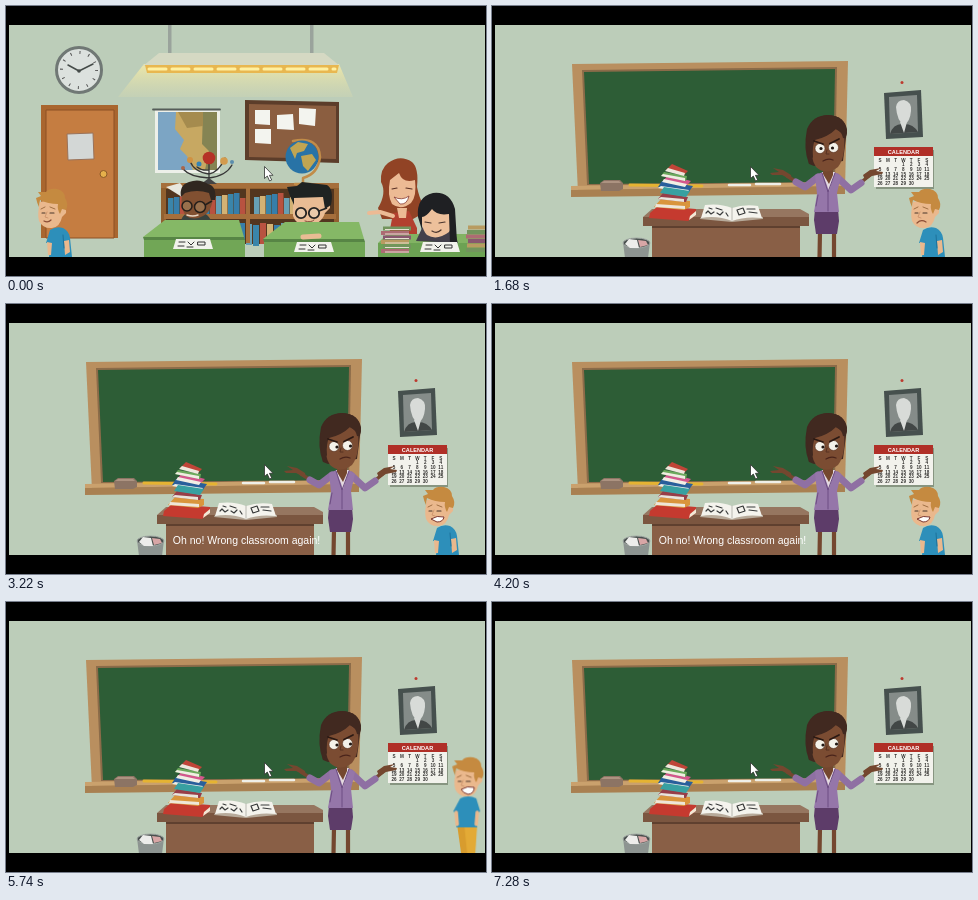
Animation, 480 px wide and 270 px high, one loop 7.42 s. Source, as an HTML page:

```html
<!DOCTYPE html>
<html lang="en">
<head>
<meta charset="utf-8">
<title>Wrong classroom</title>
<style>
html, body { margin: 0; width: 100%; height: 100%; overflow: hidden; background: #000; }
svg { display: block; width: 100vw; height: 100vh; }
text { font-family: "Liberation Sans", Arial, sans-serif; }
.sub { font-size: 10.5px; fill: #fff; }
.line { fill: none; stroke-linecap: round; stroke-linejoin: round; }

/* One step is 140 ms, or 1.8868 % of the loop */
.room, .lesson, .asking, .calm, .aside, .answer, .low, .low-talk, .low-sad, .tall, .walk, .jaw, .leg {
  animation: 7420ms step-end infinite;
}
.room { animation-name: room; }
.lesson { animation-name: lesson; }
.asking { animation-name: asking; }
.calm { animation-name: calm; }
.aside { animation-name: aside; }
.answer { animation-name: answer; }
.low { animation-name: low; }
.low-sad { animation-name: low-sad; }
.low-talk { animation-name: aside; }
.tall { animation-name: tall; }
.walk { animation-name: walk; }
.jaw { animation-name: jaw; transform-origin: 336px 151px; }
.leg { animation-name: leg; transform-origin: 437px 220px; }
@keyframes room { 0% { visibility: visible } 3.77%, 100% { visibility: hidden } }
@keyframes lesson { 0% { visibility: hidden } 3.77%, 100% { visibility: visible } }
@keyframes asking { 0% { opacity: 0 } 3.77% { opacity: 1 } 20.75%, 100% { opacity: 0 } }
@keyframes calm { 0% { opacity: 0 } 20.75% { opacity: 1 } 35.84%, 100% { opacity: 0 } }
@keyframes aside { 0% { opacity: 0 } 35.84%, 100% { opacity: 1 } }
@keyframes answer { 0% { opacity: 0 } 35.84% { opacity: 1 } 75.47%, 100% { opacity: 0 } }
@keyframes low { 0% { opacity: 1 } 60.37%, 100% { opacity: 0 } }
@keyframes low-sad { 0% { opacity: 1 } 35.84%, 100% { opacity: 0 } }
@keyframes tall { 0% { opacity: 0 } 60.37%, 100% { opacity: 1 } }
@keyframes walk {
  0% { transform: none }
  71.69% { transform: none; animation-timing-function: steps(8) }
  86.79%, 100% { transform: translate(54px, 9px) }
}
@keyframes jaw {
  0% { transform: scaleY(.5) } 5.66% { transform: none } 7.54% { transform: scaleY(.5) }
  9.43% { transform: none } 11.32% { transform: scaleY(.6) } 13.2% { transform: none }
  15.09% { transform: scaleY(.5) } 16.98%, 100% { transform: none }
}
@keyframes leg {
  0% { transform: none } 73.58% { transform: rotate(15deg) } 77.35% { transform: rotate(-8deg) }
  81.13%, 100% { transform: rotate(15deg) }
}
</style>
</head>
<body>
<svg viewBox="0 0 480 270" preserveAspectRatio="none">
<defs>
  <linearGradient id="glow" x2="0" y2="1">
    <stop stop-color="#eee7a8"/><stop offset="1" stop-color="#d3d8b0" stop-opacity=".35"/>
  </linearGradient>
  <g id="head">
    <path fill="#eab88d" d="M421 196Q418 208 420 215Q424 223 433 222Q441 221 443 211L447 207Q448 202 443 202L440 192Z"/>
    <path fill="#c58a40" d="M417 192L422 190L419 186L427 186Q430 182 438 183Q446 185 446 192Q450 198 447 204L443 203L441 208Q438 203 439 198Q429 198 421 194Q420 198 420 201Q418 197 417 192Z"/>
    <path class="line" stroke="#8d5e32" stroke-width=".8" d="M422 203L426 201M431 201L436 203"/>
    <path class="line" stroke="#49362c" stroke-width="1.1" d="M423 207H426M431 207H435"/>
    <path class="line" stroke="#c88e67" stroke-width=".8" d="M428 206L426 211L429 212"/>
  </g>
  <g id="slouch">
    <path fill="#2d8fba" d="M431 224Q437 220 444 222Q450 225 451 232L453 251H430L432 237L427 237Z"/>
    <path fill="#eab88d" d="M445 235L450 234L451 246L446 249ZM428 236L433 237L432 249L429 249Z"/>
    <path class="line" stroke="#1d719a" stroke-width="1" d="M444 229L445 242"/>
    <use href="#head"/>
  </g>
  <g id="sheet">
    <path fill="#f2f2ec" d="M-17 -5H17L20 5H-20Z"/>
    <path class="line" stroke="#333" stroke-width="1" d="M-14 -2H-8M-5 -2L-2 1L1 -2M5 -2H12V1H5ZM-15 2H-9M-6 3H0"/>
  </g>
  <g id="desk">
    <path fill="#85b866" d="M22 0H96L101 17H0Z"/>
    <path fill="#578545" d="M0 17H101L102 20H1Z"/>
    <path fill="#71a656" d="M1 20H102V40H1Z"/>
  </g>
</defs>
<rect width="480" height="270" fill="#bccdb9"/>

<g class="room">
  <g id="lamp">
    <path fill="url(#glow)" d="M138 58H333L347 91H112Z"/>
    <path fill="#9aa39c" d="M162 19h3.5v29h-3.5zM304 19h3.5v29h-3.5z"/>
    <path fill="#d5d9c3" d="M153 47H318L334 60H137Z"/>
    <path fill="#e8b750" d="M139 59H333L331 67H141Z"/>
    <path class="line" stroke="#fff0a0" stroke-width="3" stroke-dasharray="17 6" d="M143 63H329"/>
  </g>
  <g id="clock">
    <circle cx="73" cy="64" r="22.5" fill="#dce1de" stroke="#707875" stroke-width="3"/>
    <circle cx="73" cy="64" r="17.5" fill="none" stroke="#555" stroke-width="3" stroke-dasharray="1 8.163"/>
    <path class="line" stroke="#454b49" stroke-width="1.5" d="M62 59L73 65L87 58"/>
    <circle cx="73" cy="65" r="1.8" fill="#454b49"/>
  </g>
  <path fill="#a9662f" d="M35 99H112V232H35Z"/>
  <path fill="#c57d41" stroke="#8c5024" d="M40 104H108V232H40Z"/>
  <path fill="#d3d7d6" stroke="#99725a" d="M61 128L87 127L88 153L62 154Z"/>
  <circle cx="97.500" cy="168" r="3.500" fill="#e5b04b" stroke="#8b5a28"/>

  <path fill="#edf0e9" d="M149 103H214V167H149Z"/>
  <path fill="#7ca5c4" d="M152 106H211V164H152Z"/>
  <path fill="#c7a862" d="M170 106H211V164H187L181 150L174 143L178 134L169 123Z"/>
  <path fill="#858453" d="M197 106H211V164H199L203 145L196 138Z"/>
  <path fill="#a58b4e" d="M172 106H197V120L181 122Z"/>
  <path class="line" stroke="#555c58" stroke-width="1.800" d="M147 103.500H214"/>

  <path fill="#5c3d2a" d="M239 94L333 96V157L239 154Z"/>
  <path fill="#8b5e40" d="M243 98L330 100V153L243 151Z"/>
  <path fill="#f3f4ef" d="M249 104L264 104L264 119L249 118ZM249 123L265 123L265 138L249 137ZM271 109L287 108L288 124L271 123ZM293 102L310 103L309 120L293 118Z"/>

  <g id="shelf">
    <path fill="#92602f" d="M155 178H333V238H155Z"/>
    <path fill="#53361f" d="M160 183H328V208H160ZM160 213H328V238H160Z"/>
    <g id="books"></g>
    <path fill="#a66f3c" d="M155 177H333V182H155ZM158 208H330V213H158ZM240 182h4v55h-4z"/>
  </g>
  <g id="orrery">
    <path class="line" stroke="#363637" stroke-width="1.300" d="M203 153V178M177 163Q184 171 203 172Q220 170 226 159M184 155Q188 166 203 168Q213 166 219 152M191 161Q196 165 203 164"/>
    <path fill="#444" d="M195 178L203 172L211 178Z"/>
    <circle cx="203" cy="152" r="6.300" fill="#b53227"/>
    <circle cx="184" cy="154" r="3" fill="#d09243"/>
    <circle cx="193" cy="158" r="2.500" fill="#3484b7"/>
    <circle cx="218" cy="155" r="3.800" fill="#d39b4d"/>
    <circle cx="226" cy="156" r="2" fill="#5b8dad"/>
    <circle cx="177" cy="162" r="2" fill="#a9664c"/>
  </g>
  <g id="globe">
    <path class="line" stroke="#c18c48" stroke-width="2.500" d="M287 135Q313 130 314 151Q312 168 297 172V178M289 178H305"/>
    <circle cx="296" cy="151" r="16.500" fill="#2873a6"/>
    <path fill="#c0a552" d="M284 142L292 136L302 138L298 145L291 147L289 153ZM295 150L306 148L310 154L302 165L297 160Z"/>
  </g>

  <g id="pupil">
    <path fill="#e8e8df" d="M160 181L174 177L181 186L176 191Z"/>
    <path fill="#39433e" d="M174 220Q175 205 190 205Q204 206 207 220Z"/>
    <path fill="#815031" d="M176 187Q174 202 180 210Q188 215 197 210Q206 206 207 190L204 182L179 181Z"/>
    <path fill="#302720" d="M175 191Q173 179 183 176Q193 172 202 178Q211 180 209 194L205 194L203 187Q191 183 179 187Z"/>
    <g fill="#98704c" stroke="#251f1b" stroke-width="1.500">
      <circle cx="181" cy="200" r="5"/><circle cx="194" cy="201" r="5.500"/><path d="M199 199L206 195"/>
    </g>
    <path class="line" stroke="#e8d6c4" stroke-width="1.500" d="M181 209Q187 211 192 209"/>
  </g>
  <g id="classmate">
    <path fill="#303935" d="M291 236L295 221L311 216L324 223L324 237Z"/>
    <path fill="#e9bc94" d="M287 190L287 210Q290 219 301 220Q315 219 319 207L324 202V193L315 187Z"/>
    <path fill="#1f2322" d="M284 190L281 181L291 180L296 176L321 179Q328 183 325 199L319 203L317 191L288 192V199Z"/>
    <g fill="#e9c9aa" stroke="#222" stroke-width="1.800">
      <circle cx="295" cy="207" r="5.200"/><circle cx="308" cy="207" r="5.200"/><path d="M313 205L321 202"/>
    </g>
    <path class="line" stroke="#884e3c" d="M299 215Q305 217 308 214"/>
  </g>
  <use href="#desk" x="137" y="214"/>
  <use href="#desk" x="257" y="216"/>
  <path class="line" stroke="#e9bc94" stroke-width="5" d="M297 231L313 230"/>
  <use href="#sheet" x="187" y="238"/>
  <use href="#sheet" x="308" y="241"/>

  <g id="redhead">
    <path fill="#914325" d="M382 157Q394 148 406 156Q413 162 411 181Q415 200 423 204L407 213H376L372 202Q381 187 375 176Q374 163 382 157Z"/>
    <path fill="#b2402f" d="M383 229L387 207L403 205L411 222V231Z"/>
    <path fill="#ecba94" d="M384 174Q381 189 386 198Q395 205 405 197Q411 190 409 174Q397 178 393 167ZM391 202H401L400 212H393Z"/>
    <path class="line" stroke="#593024" stroke-width="1.200" d="M386 183L391 182M400 182L406 183"/>
    <path fill="#fff" stroke="#883d34" stroke-width=".8" d="M388 191Q396 195 403 190Q401 199 394 198Z"/>
    <path class="line" stroke="#ecba94" stroke-width="4" d="M363 207L374 206L387 210"/>
  </g>
  <path fill="#82b363" d="M381 228H480V237H372Z"/>
  <path fill="#6ca253" d="M372 237H480V252H372Z"/>
  <g id="writer">
    <path fill="#44404b" d="M410 235L417 220H447L452 237Z"/>
    <path fill="#edc09b" d="M417 200Q413 221 421 229Q431 235 443 226Q449 217 443 199Z"/>
    <path fill="#1f2023" d="M412 211Q410 191 427 187Q444 185 449 203L451 236L444 238L443 208Q431 210 426 203Q420 211 416 211L416 224Z"/>
    <path class="line" stroke="#49342d" stroke-width="1.200" d="M419 216L425 217M433 217L439 216M426 225Q431 228 435 224"/>
  </g>
  <use href="#sheet" x="434" y="241"/>
  <g id="stacks"></g>
  <use href="#slouch" x="-387"/>
  <path class="line" stroke="#8b4c35" stroke-width="1.200" d="M38 215Q42 217 45 214"/>
</g>

<g class="lesson">
  <g id="board">
    <path fill="#b98f5f" d="M80 58L356 55L353 184L86 187Z"/>
    <path fill="#8b6b49" d="M90 64L345 61L343 177L95 179Z"/>
    <path fill="#2d5d36" d="M92 66L343 63L341 176L97 178Z"/>
    <path fill="#caa16d" d="M79 180L353 176V180L79 184Z"/>
    <path fill="#a98051" d="M79 184L353 180V188L79 191Z"/>
    <path fill="#8c7464" d="M108 177L112 174H128L131 177V183L127 185H109Z"/>
    <path fill="#ad9381" d="M109 177L112 175H127L129 177Z"/>
    <path class="line" stroke="#e5b332" stroke-width="3" d="M138 179L210 180"/>
    <path class="line" stroke="#efefe8" stroke-width="2.500" d="M237 179L258 179M264 178L288 178"/>
  </g>
  <g id="portrait">
    <circle cx="410" cy="76.500" r="1.500" fill="#bd3a2f"/>
    <path fill="#46504e" d="M392 87L429 84L431 131L394 133Z"/>
    <path fill="#858c89" d="M397 91L425 89L426 126L398 128Z"/>
    <path fill="#424746" d="M398 128Q401 118 410 118Q421 117 426 126Z"/>
    <path fill="#d8dbd8" d="M404 101Q405 94 412 94Q420 96 419 105Q418 116 412 119Q405 115 404 101ZM408 116H415L412 127Z"/>
  </g>
  <g id="calendar">
    <path fill="#879581" d="M384 144H442V183H384Z"/>
    <path fill="#f2f2ec" d="M382 142H441V181H382Z"/>
    <path fill="#b02f27" d="M382 141H441V150H382Z"/>
    <text x="411.500" y="147.800" font-size="5.600" font-weight="700" text-anchor="middle" fill="#fff">CALENDAR</text>
    <g id="days" font-size="4.600" font-weight="700" text-anchor="middle" fill="#343331"></g>
  </g>

  <g id="teacher">
    <path class="line" stroke="#74472f" stroke-width="4.200" d="M328 225L327.500 252M342 225L342 252"/>
    <path fill="#5d3c69" d="M323 203H346L347 215L345 228H324L322 214Z"/>
    <path class="line" stroke="#74472f" stroke-width="3.500" d="M306 177L295 170M367 178L377 170"/>
    <path fill="#74472f" d="M300 174L290 169L280 169L278 167L287 166L281 162L291 164L299 169ZM373 174L380 170L390 168L391 166L384 165L389 162L378 164L371 169Z"/>
    <path class="line" stroke="#8f70a3" stroke-width="7" d="M326 171L313 181L304 176M345 171L359 184L369 177"/>
    <path fill="#9576a9" d="M323 169L331 166H342L349 170L345 187L347 206H322L325 188Z"/>
    <path fill="#e4d9df" d="M330 166H343L337 185Z"/>
    <path fill="#74472f" d="M331 160H341V169L337 178L331 168Z"/>
    <path class="line" stroke="#6d4d83" stroke-width="1" d="M330 167L336 186L343 167M336 186V205M326 189L324 200"/>
    <path fill="#412920" d="M317 158Q311 143 315 123Q321 109 336 109Q353 110 355 124L351 155L322 160Z"/>
    <path fill="#7b4c32" d="M320 134Q318 153 324 161Q334 170 346 161Q354 151 352 128L342 122Z"/>
    <path fill="#412920" d="M315 140Q312 112 335 109Q354 109 355 127Q354 133 351 132Q350 126 344 123Q336 131 323 134Q320 140 321 151L317 158Z"/>
    <g fill="#f4f2ea" stroke="#54301f" stroke-width=".6">
      <circle cx="328" cy="142.500" r="5"/><circle cx="341.500" cy="141.500" r="5"/>
    </g>
    <path class="line" stroke="#2b1913" stroke-width="1.800" d="M322 135L331 138M338 137.500L347 133"/>
    <path class="line" stroke="#573020" stroke-width="1" d="M335 144L334 148L337 148"/>
    <g class="asking">
      <circle cx="329" cy="142.500" r="1.600" fill="#221814"/><circle cx="340.500" cy="142" r="1.600" fill="#221814"/>
      <g class="jaw">
        <path fill="#57201b" d="M329 151Q337 153 344 150Q344 160 336 161Q329 160 329 151Z"/>
        <path fill="#fff" d="M330 152Q337 154 343 151V154Q337 156 330 155Z"/>
      </g>
    </g>
    <g class="calm">
      <circle cx="329" cy="142.500" r="1.600" fill="#221814"/><circle cx="340.500" cy="142" r="1.600" fill="#221814"/>
      <path class="line" stroke="#4a241b" stroke-width="1.300" d="M331 155Q336 152 341 154"/>
    </g>
    <g class="aside">
      <circle cx="331" cy="143" r="1.600" fill="#221814"/><circle cx="344.500" cy="142" r="1.600" fill="#221814"/>
      <path class="line" stroke="#4a241b" stroke-width="1.300" d="M334 155Q339 152 344 154"/>
    </g>
  </g>

  <g id="bin">
    <path fill="#8d9491" d="M131 236L133 252H156L158 236Z"/>
    <ellipse cx="144.500" cy="237" rx="13.500" ry="5" fill="#49504e" stroke="#a2a9a5"/>
    <path fill="#ededeb" d="M133 238L137 233L145 234L147 242L138 242Z"/>
    <path fill="#d8a6a6" d="M146 234L154 235L156 239L148 241Z"/>
  </g>
  <g id="table">
    <path fill="#967660" d="M160 203H308L317 208V211H151Z"/>
    <path fill="#7b5640" d="M151 211H317V220H151Z"/>
    <path fill="#895f46" d="M160 220H308V252H160Z"/>
    <path fill="#5f402f" d="M160 220H308V222H160Z"/>
  </g>
  <g id="pile">
    <path fill="#c53a2f" d="M166 200L204 203V209L196 215L157 212L158 207Z"/>
    <path fill="#f1e8d5" d="M198 210L204 205V209L197 214Z"/>
    <path fill="#d9953c" d="M169 193L198 195L198 201L192 204L162 201Z"/>
    <path fill="#eee6d8" d="M164 198L193 200V203L163 201Z"/>
    <path fill="#973e48" d="M171 187L196 191L194 196L166 193Z"/>
    <path fill="#e9e5dc" d="M169 191L192 193V196L166 193Z"/>
    <path fill="#295f9b" d="M170 175L201 180L196 187L166 181Z"/>
    <path fill="#eceee8" d="M169 180L197 184L195 187L166 182Z"/>
    <path fill="#38a0a1" d="M172 181L198 185L194 191L168 187Z"/>
    <path fill="#d3578c" d="M176 169L199 175L195 179L171 175Z"/>
    <path fill="#f1eee4" d="M172 173L195 178L193 181L170 176Z"/>
    <path fill="#6ca95c" d="M172 166L195 170L194 175L169 170Z"/>
    <path fill="#f0eee2" d="M171 168L193 172L193 175L169 170Z"/>
    <path fill="#c04538" d="M180 158L196 165L192 169L174 164Z"/>
    <path fill="#eee8dd" d="M176 162L193 167L192 170L173 165Z"/>
  </g>
  <g id="open-book">
    <path fill="#b7aa9a" d="M208 213L240 216L271 213V211H209Z"/>
    <path fill="#f4f3ed" d="M213 199Q228 197 240 202Q252 198 266 200L270 212Q253 210 240 215Q225 209 209 212Z"/>
    <path class="line" stroke="#393b3b" stroke-width="1.200" d="M217 202L220 203M224 202L230 204M214 207L216 205L219 208L222 206M225 207L228 209L231 206M234 207L236 210M245 204L251 202L253 207L247 209ZM255 203H263M257 206L265 207"/>
    <path class="line" stroke="#a9a8a1" stroke-width=".8" d="M240 202V214"/>
  </g>

  <g class="low">
    <use href="#slouch"/>
    <path class="line low-sad" stroke="#8b4c35" stroke-width="1.200" d="M425 217Q429 213 434 216"/>
    <path class="low-talk" fill="#fff" stroke="#7a352c" stroke-width="1" d="M425 215Q431 211 438 213Q437 218 431 218Z"/>
  </g>
  <g class="tall">
    <g class="walk">
      <path class="leg" fill="#d89c2e" d="M431 219H442L440 246H443V249H431Z"/>
      <path fill="#e3aa36" d="M438 219H451L449 249H441Z"/>
      <path fill="#2d8fba" d="M434 193Q442 189 450 193L454 206L451 208V222H430V208L427 206Z"/>
      <path class="line" stroke="#eab88d" stroke-width="3.500" d="M430 207L431 219M451 207L450 219"/>
      <use href="#head" x="9" y="-31"/>
      <path fill="#fff" stroke="#7a352c" stroke-width="1" d="M435 184Q441 180 448 182Q448 188 442 189Q437 188 435 184Z"/>
    </g>
  </g>
  <text class="sub asking" x="183.500" y="240.500">Are you even in this class?</text>
  <text class="sub answer" x="166.800" y="240.200">Oh no! Wrong classroom again!</text>
</g>

<path fill="#fff" stroke="#303431" stroke-width=".8" d="M258.500 160.500V172.500L261.300 170L263.600 175L265.700 174L263.400 169.300H267Z"/>
<path fill-rule="evenodd" d="M0 0H480V270H0ZM3 19V251H479V19Z"/>
</svg>
<script>
const add = (id, tag, attrs, text = "") => {
  const node = document.createElementNS("http://www.w3.org/2000/svg", tag);
  for (const key in attrs) node.setAttribute(key, attrs[key]);
  node.textContent = text;
  document.getElementById(id).append(node);
};
const bar = (id, x, y, width, height, fill) => add(id, "rect", { x, y, width, height, fill });
const covers = ["#3a85aa", "#b85240", "#d3b274", "#377eaa", "#67a0b5"];

// Calendar: weekdays, then a month starting on Wednesday
const cell = (col, row, text) => add("days", "text", { x: 388 + col * 7.8, y: 155.5 + row * 4.7 }, text);
[..."SMTWTFS"].forEach((day, col) => cell(col, 0, day));
for (let day = 1; day <= 30; day++) {
  const slot = day + 2;
  cell(slot % 7, 1 + Math.floor(slot / 7), day);
}

// Shelf books
for (let i = 0; i < 20; i++) {
  const x = 162 + i * 6 + (i > 12 ? 8 : 0), height = 16 + i * 7 % 6;
  bar("books", x, 208 - height, 5.5, height, covers[i * 3 % 5]);
}
for (let i = 0; i < 12; i++) bar("books", 212 + i * 7, 217 + i % 3, 6, 21, covers[i % 5]);

// Book stacks on the right desk
const spines = ["#ad6b73", "#73945d", "#b89b61", "#88576f"];
for (let i = 0; i < 6; i++) {
  const y = 243 - i * 4.5;
  bar("stacks", 375 + i % 2 * 2, y, 28, 4, spines[i % 4]);
  bar("stacks", 460 + i % 3, y - 1, 20, 4, spines[(i + 1) % 4]);
  bar("stacks", 379, y + 2.5, 24, 1, "#e5dfd0");
}
</script>
</body>
</html>
```
